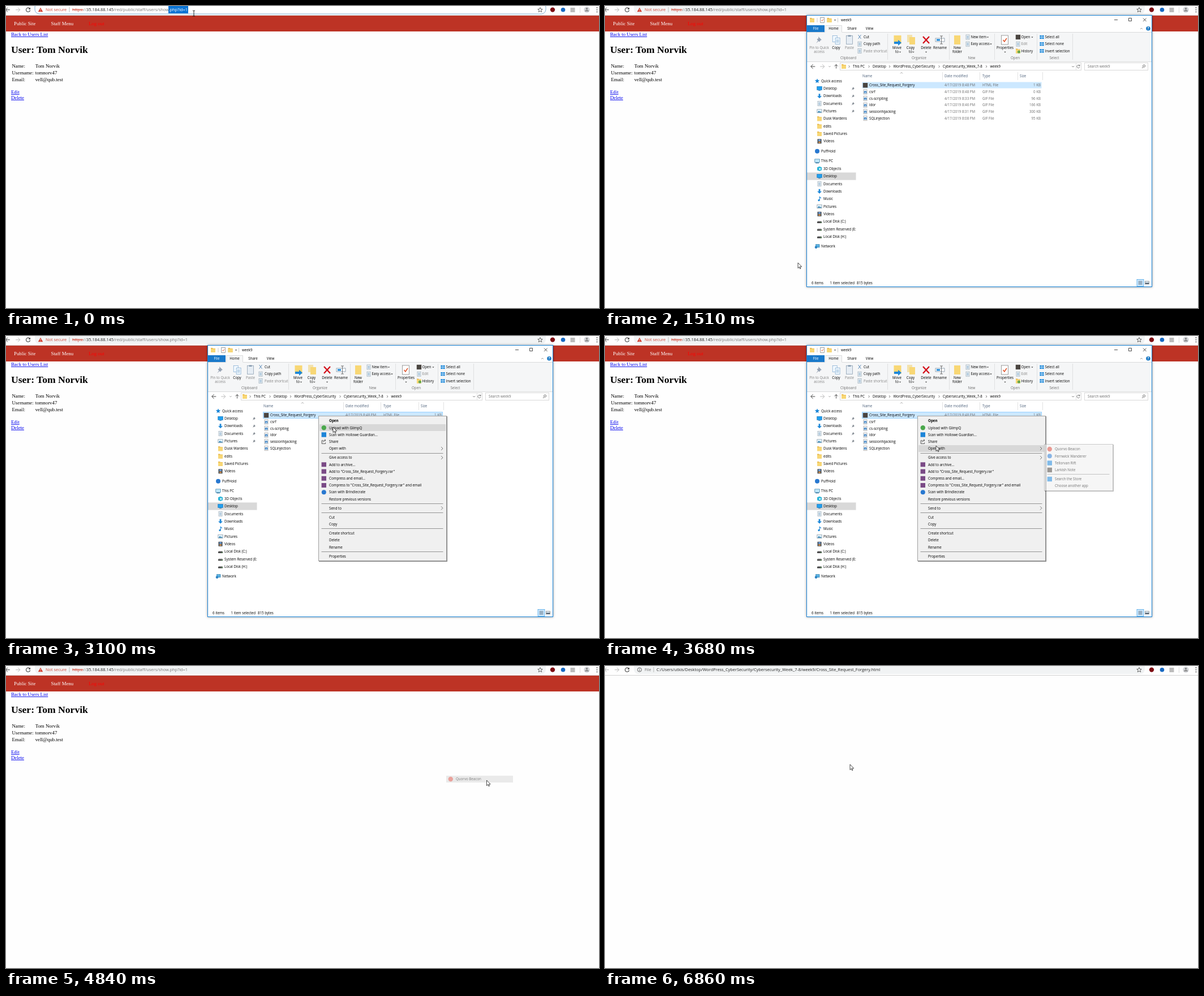
These frames come from a looping animation (1048 px wide and 534 px high, 8000 ms). An HTML page:

```html
<!DOCTYPE html>
<html lang="en">
<head>
<meta charset="utf-8">
<title>Opening a local page</title>
<style>
html, body { margin: 0; width: 100%; height: 100%; overflow: hidden; background: #fefefe; }
svg { display: block; width: 100vw; height: 100vh; }
text { font: 6.2px "Open Sans", "Noto Sans", sans-serif; fill: #000; white-space: pre; }
.url text { font-size: 7.36px; fill: #222; }
.page text { font: 8.8px "Liberation Serif", "Times New Roman", serif; fill: #000; }
.page .title { font-size: 17.6px; font-weight: bold; }
.page .link { fill: #00e; text-decoration: underline; }
.page .nav { fill: #fff; }
.page .out { fill: #f00; }
text.dim, .url .dim { fill: #6d6d6d; }
text.off { fill: #838383; }
text.head { fill: #4c607a; }
text.white { fill: #fff; }
.url .warn { fill: #cf4535; }
text.mid { text-anchor: middle; }
text.end { text-anchor: end; }
text.bold { font-weight: 700; }
#frame { filter: drop-shadow(.5px .5px 2.2px rgba(0, 0, 0, .4)); }
.popup { filter: drop-shadow(1.4px 1.4px .6px rgba(0, 0, 0, .5)); }
</style>
</head>
<body>
<svg id="stage" viewBox="0 0 1048 534"></svg>
<script>
const BLUE = '#1e88d8', GOLD = '#f8d775', INK = '#444';

// Drawing helpers; text and icons are placed by their vertical centre.
const rect = (x, y, w, h, fill, more = '') =>
  `<rect x="${x}" y="${y}" width="${w}" height="${h}" fill="${fill}" ${more}/>`;
const disc = (x, y, r, fill, more = '') => `<circle cx="${x}" cy="${y}" r="${r}" fill="${fill}" ${more}/>`;
const fill = (d, color) => `<path d="${d}" fill="${color}"/>`;
const line = (d, color = INK, w = .8) => `<path d="${d}" fill="none" stroke="${color}" stroke-width="${w}"/>`;
const words = (x, y, s, cls = '') => `<text x="${x}" y="${y}" class="${cls}">${s}</text>`;
const text = (x, y, s, cls) => words(x, y + 2.2, s, cls);
const group = (id, body, more = '') => `<g id="${id}" ${more}>${body}</g>`;
const box = (x, y, w, h, color, stroke) =>
  rect(x - w / 2, y - h / 2, w, h, color, stroke ? `stroke="${stroke}" stroke-width=".7"` : '');
const chevron = (x, y) => line(`M${x - 1} ${y - 2}l2 2-2 2`, INK, .7);
const caret = (x, y) => fill(`M${x - 1.6} ${y - .8}h3.2l-1.6 1.9z`, '#333');
const arrow = (x, y, dir, color) =>
  line(`M${x - 3.8 * dir} ${y}h${7.6 * dir}M${x} ${y - 3.8}l${3.8 * dir} 3.8 ${-3.8 * dir} 3.8`, color, 1);

const icon = {
  none: () => '',
  folder: (x, y) => fill(`M${x - 4} ${y - 4}h3l1 1h4v7h-8z`, '#e8b84b') + rect(x - 4, y - 2.3, 8, 6.3, GOLD),
  doc: (x, y) => box(x, y, 6, 8, '#fff', '#8aa0b0') + line(`M${x - 1.8} ${y - 1.6}h3.6m-3.6 1.8h3.6m-3.6 1.8h3.6`, '#5b8fb8'),
  gif: (x, y) => box(x, y, 6, 8, '#fff', '#9a9a9a') + box(x, y + .5, 4.6, 4, '#3b7fc0') + disc(x, y + 1, 1, '#d8efff'),
  screen: (x, y) => box(x, y - .5, 8.5, 6, '#20a0f0', '#1572b8') + line(`M${x - 2} ${y + 3.6}h4`, '#1572b8'),
  pc: (x, y) => box(x, y - .6, 8.5, 5.6, '#bfe8fa', '#3a7ca5') + line(`M${x - 3} ${y + 3.4}h6`, '#3a7ca5', 1.2),
  down: (x, y) => fill(`M${x - 1.4} ${y - 4}h2.8v4h2.6l-4 4-4-4h2.6z`, BLUE),
  pic: (x, y) => box(x, y, 8.4, 6, '#e5f5ff', '#8494a0') + fill(`M${x - 3.6} ${y + 2.4}l2.6-3 2 2 1-1 1.8 2z`, '#2f7fae'),
  film: (x, y) => box(x, y, 7, 8, '#3c4650') + box(x, y - 1.8, 4, 2.8, '#6fa0d8') + box(x, y + 1.8, 4, 2.8, '#c48a50'),
  cube: (x, y) => fill(`M${x} ${y - 4}l4 1.6v5L${x} ${y + 4.2}l-4-1.6v-5z`, '#28b4d8') + box(x + .8, y + .4, 3, 3, '#d4f4fb'),
  note: (x, y) => disc(x - 1, y + 2.4, 1.7, BLUE) + line(`M${x + .3} ${y + 2.4}v-6l2.6 2.4`, BLUE, 1.1),
  disk: (x, y) => box(x, y + 1.4, 8, 2.8, '#444') + line(`M${x - 3} ${y - .6}h6`, '#aaa', 1) + disc(x + 2.6, y + 1.6, .6, '#6f6'),
  net: (x, y) => box(x + .8, y - 1, 6.4, 5, '#5cb4e4', '#2a78a8') + disc(x - 2, y + 1.4, 2.3, '#2c83c4'),
  star: (x, y) => fill(`M${x} ${y - 4}l1.2 2.8 3 .2-2.3 2 .8 3L${x} ${y + 2.4} ${x - 2.7} ${y + 4}l.8-3-2.3-2 3-.2z`, BLUE),
  share: (x, y) => line(`M${x - 1} ${y - 2}h-2.6v5.6h6.4v-2M${x - 1.4} ${y + 1}q.4-3.4 4.4-3.4m-1.8-1.8l2 1.8-2 1.8`, '#333'),
  dark: (x, y) => box(x, y, 8.4, 8.4, '#4a4540'),
  blue: (x, y) => box(x, y, 8.4, 8.4, '#1c84d8'),
  blueDot: (x, y) => disc(x, y, 4, '#2878d0'),
  greenDot: (x, y) => disc(x, y, 4.2, '#4aa84c'),
  redDot: (x, y) => disc(x, y, 4.2, '#d8493c'),
  purple: (x, y) => box(x, y, 8.4, 8, '#7a4a86'),
  copy: (x, y, c = '#7aa7cf') => box(x - 2.3, y - 2, 8, 11, '#f4faff', c) + box(x + 2.6, y + 2, 8, 11, '#f4faff', c)
    + line(`M${x} ${y}h5m-5 2h5m-5 2h5`, c),
  check: (x, y, s = 1) => box(x, y, 12 * s, 16 * s, '#fff', '#777')
    + line(`M${x - 3 * s} ${y}l${2.4 * s} ${3 * s} ${4 * s}-${6 * s}`, '#e0552d', 1.6 * s),
  tile: (x, y) => box(x, y, 8, 7, '#dceefb')
    + [-2, 2].map(d => box(x + d, y - 1.8, 3.2, 2.6, BLUE) + box(x + d, y + 1.8, 3.2, 2.6, BLUE)).join('')
};

function toolbar() {
  return rect(0, 0, 1048, 17, '#fefefe') + rect(0, 16, 1048, 1, '#d2d2d2')
    + rect(51, -6, 903, 20, '#f1f3f4', 'rx="8" id="pill"')
    + group('back', arrow(3, 6.7, -1, INK)) + arrow(21, 6.7, 1, '#b9b9b9')
    + line('M41.8 4.3a3.6 3.6 0 1 0 .8 3.2', INK, 1.1) + fill('M43 2.6v3.4h-3.4z', INK)
    + line('M944 2.6l1.2 2.8 3 .2-2.3 2 .8 3-2.7-1.6-2.7 1.6.8-3-2.3-2 3-.2z', INK, .8)
    + disc(966, 6.6, 4.2, '#7d0b12') + disc(984.5, 6.8, 3.8, '#1769c2') + box(1001.5, 7, 8, 8, '#bcbcbc')
    + line('M1014.5 2v10', '#d5d5d5') + disc(1026.5, 6.5, 5.2, '#d4d6da')
    + disc(1026.5, 4.8, 1.7, '#888') + fill('M1023 9.5a3.5 2.6 0 0 1 7 0z', '#888')
    + [3, 6.7, 10.4].map(y => disc(1044.5, y, .9, INK)).join('');
}

function webUrl() {
  return rect(287, 0, 35, 13, '#0b74d4', 'id="mark"')
    + fill('M61 2.8l4.2 7.5h-8.4z', '#d23b2b') + line('M61 5v2.6m0 .8v1', '#fff')
    + words(70, 9.4, 'Not secure', 'warn') + line('M112 2v9', '#aaa')
    + '<text x="117" y="9.4"><tspan fill="#d0402f" text-decoration="line-through">https:</tspan><tspan fill="#888">//</tspan>'
    + '35.184.88.145<tspan fill="#777">/red/public/staff/users/show</tspan><tspan id="tail">.php?id=1</tspan></text>';
}

function fileUrl() {
  return disc(61, 6.6, 3.6, 'none', 'stroke="#555" stroke-width=".9"') + line('M61 6v2.8m0-4.6v1', '#555', .9)
    + words(70, 9.4, 'File', 'dim') + line('M86 2v9', '#aaa')
    + words(91, 9.4, 'C:/Users/utkis/Desktop/WordPress_CyberSecurity/Cybersecurity_Week_7-8/week9/Cross_Site_Request_Forgery.html');
}

function page() {
  const rows = [['Name:', 'Tom Norvik'], ['Username:', 'tomnorv47'], ['Email:', 'vell@qub.test']];
  return rect(0, 17, 1048, 28, '#bd3325')
    + words(14, 34, 'Public Site', 'nav') + words(79.5, 34, 'Staff Menu', 'nav') + words(146, 34, 'Log out', 'out')
    + words(9, 53, 'Back to Users List', 'link') + words(9, 82.6, 'User: Tom Norvik', 'title')
    + rows.map(([k, v], i) => words(10.5, 108.8 + i * 12.2, k) + words(51.7, 108.8 + i * 12.2, v)).join('')
    + words(9, 155, 'Edit', 'link') + words(9, 164.8, 'Delete', 'link');
}

function ribbon() {
  const big = (x, s, cls = '') => s.split('|').map((w, i) => text(x, 74 + i * 7, w, 'mid ' + cls)).join('');
  const small = (x, ix, names, art) => names.map((s, i) => {
    const y = 55 + i * 12.2, off = s[0] === '-';
    return icon[art[i]](ix, y) + text(x, y, off ? s.slice(1) : s, off ? 'off' : '');
  }).join('');
  const tabs = [['File', 372.5, 'white'], ['Home', 404], ['Share', 436.5], ['View', 467.5]];
  const titles = [['Clipboard', 430], ['Organize', 555], ['New', 648], ['Open', 725], ['Select', 794]];
  return rect(357, 46, 609, 52, '#f5f6f7') + line('M357 98.5H966M357 46.5H389M419 46.5H966', '#dadbdc', 1)
    + rect(357, 34, 31, 12, '#1979ca') + rect(389, 34, 30, 13, '#f5f6f7') + line('M389.5 46V34.5h29v12', '#dadbdc', 1)
    + tabs.map(([s, x, cls = '']) => text(x, 40, s, 'mid ' + cls)).join('')
    + line('M946 41l2-2 2 2', '#888') + disc(960, 39.7, 3.8, '#1677c5') + text(960, 39.7, '?', 'mid bold white')
    + titles.map(([s, x]) => text(x, 92, s, 'mid dim')).join('')
    + [499.5, 608.5, 688.5, 763.5, 826.5].map(x => line(`M${x} 49v46`, '#dfe0e1', 1)).join('')
    + fill('M377 54l6 6-2 .6-2 3-1.6-1.6-4.4 4 3.4-5-2-2 3-2z', '#98a4b4') + big(378.5, 'Pin to Quick|access', 'off')
    + icon.copy(408.5, 60) + big(408.5, 'Copy') + box(432, 60, 11, 15, '#e6edf4', '#8095aa')
    + box(432, 52.8, 5, 2.4, '#8095aa') + big(432, 'Paste', 'off')
    + line('M447.5 51l5 7m0-7l-5 7', '#3d75ad') + small(457, 450, ['Cut', 'Copy path', '-Paste shortcut'], ['none', 'doc', 'doc'])
    + rect(510.5, 52, 13, 15, GOLD) + fill('M511 63h7v-3l6 5-6 5v-3h-7z', BLUE) + big(516, 'Move|to')
    + caret(521.5, 81.5) + rect(534, 51, 9, 13, '#f3e2ac') + rect(538, 55, 10, 13, GOLD) + big(540, 'Copy|to') + caret(545, 81.5)
    + line('M562 54l11 12m0-12l-11 12', '#d4131d', 2.4) + big(567.5, 'Delete') + caret(567.5, 81.5)
    + box(592, 60, 16, 6, '#fff', '#6e8294') + rect(586, 58.5, 6, 3, BLUE)
    + line('M592 53h5m-2.5 0v14m-2.5 0h5', '#555') + big(592, 'Rename')
    + rect(617, 52, 11, 16, GOLD) + big(622.5, 'New|folder')
    + small(646.5, 641, ['New item', 'Easy access'], ['doc', 'doc']) + caret(676.5, 55.2) + caret(682, 67.4)
    + icon.check(706.5, 60) + big(707, 'Properties') + caret(707, 81.5)
    + small(735.5, 730, ['Open', '-Edit', 'History'], ['dark', 'doc', 'folder']) + caret(755, 55.2)
    + disc(731.5, 81, 2.6, '#6aa84f') + small(777.5, 772, ['Select all', 'Select none', 'Invert selection'], ['tile', 'tile', 'tile']);
}

function tree() {
  const branch = (y0, list) => list.map(([art, s], i) => {
    const y = y0 + i * 13.35;
    return icon[art](379, y) + text(386, y, s);
  }).join('');
  const root = (y, art, s) => icon[art](375, y) + text(382, y, s);
  const pin = y => fill(`M438 ${y - 3}l3 3-1.4.4-1 1.6-.8-.8-2.4 2 2-2.6-.8-.8 1.4-1z`, '#808890');
  return rect(357, 294.4, 86.5, 13.3, '#d9d9d9')
    + root(132.3, 'star', 'Quick access')
    + branch(145.8, [['screen', 'Desktop'], ['down', 'Downloads'], ['doc', 'Documents'], ['pic', 'Pictures'],
      ['folder', 'Dusk Wardens'], ['folder', 'edits'], ['folder', 'Saved Pictures'], ['film', 'Videos']])
    + [0, 1, 2, 3].map(i => pin(146 + i * 13.35)).join('')
    + root(256.8, 'blueDot', 'PuffHold') + root(274.2, 'pc', 'This PC')
    + branch(287.7, [['cube', '3D Objects'], ['screen', 'Desktop'], ['doc', 'Documents'], ['down', 'Downloads'],
      ['note', 'Music'], ['pic', 'Pictures'], ['film', 'Videos'], ['disk', 'Local Disk (C:)'],
      ['disk', 'System Reserved (E:'], ['disk', 'Local Disk (H:)']])
    + root(425.2, 'net', 'Network');
}

function files() {
  const list = [['Cross_Site_Request_Forgery', '8:48', 1], ['csrf', '8:48', 0], ['cs-scripting', '8:33', 96],
    ['idor', '8:46', 166], ['sessionhijacking', '8:31', 300], ['SQLinjection', '8:08', 95]];
  const heads = [['Name', 455], ['Date modified', 600], ['Type', 667], ['Size', 733]];
  return heads.map(([s, x]) => text(x, 124, s, 'head')).join('')
    + [596.5, 662.5, 729.5, 773.5].map(x => line(`M${x} 117v14`, '#e2e2e2', 1)).join('') + line('M522 119.4l2-2 2 2', '#777', .7)
    + rect(454.5, 134.5, 317, 11, '#cce8ff', 'id="row" stroke="#99d1ff"')
    + list.map(([name, time, kb], i) => {
      const y = 140.2 + i * 11.65;
      return icon[i ? 'gif' : 'dark'](460, y) + text(467, y, name) + text(600, y, `4/17/2019 ${time} PM`, 'dim')
        + text(667, y, (i ? 'GIF' : 'HTML') + ' File', 'dim') + text(770, y, kb + ' KB', 'end dim');
    }).join('');
}

function explorer() {
  const crumbs = [['This PC', 438], ['Desktop', 473], ['WordPress_CyberSecurity', 509.5], ['Cybersecurity_Week_7-8', 597], ['week9', 680.5]];
  return rect(356.5, 16.5, 610, 480, '#fff', 'id="frame" stroke="#1883d7"')
    + icon.folder(366, 25) + line('M375 21v8M411.5 21v8', '#aaa', .6) + icon.check(384, 25, .55) + icon.folder(396.5, 25)
    + caret(406.5, 25) + text(417, 25, 'week9')
    + line('M900 24.5h6M925.5 21.5h5v5h-5zM951 21.6l5.6 5.6m0-5.6l-5.6 5.6', '#222')
    + ribbon()
    + arrow(367.5, 107, -1, INK) + arrow(384, 107, 1, '#bbb') + line('M395.4 106.2l1.6 1.6 1.6-1.6', '#777', .7)
    + line('M408.5 110.5v-7m-3 3l3-3 3 3', INK, .9)
    + rect(415.5, 100.5, 426, 13, '#fff', 'stroke="#d9d9d9"') + icon.folder(422, 107) + line('M832.5 101v12', '#e2e2e2', 1)
    + crumbs.map(([s, x]) => text(x, 107, s) + chevron(x - 6.5, 107)).join('')
    + line('M825.4 106.2l1.8 1.8 1.8-1.8M838.6 105.4a2.6 2.6 0 1 0 .4 2.4M839 103.6v2.2h-2.2', INK, .7)
    + rect(847.5, 100.5, 112, 13, '#fff', 'stroke="#d9d9d9"') + text(853, 107, 'Search week9', 'dim')
    + disc(952.6, 106, 2, 'none', 'stroke="#555" stroke-width=".8"') + line('M951.2 107.6l-2.2 2.4', '#555')
    + tree() + files()
    + text(365, 489.5, '6 items') + text(397.5, 489.5, '1 item selected') + text(445, 489.5, '815 bytes')
    + box(946, 489.5, 12, 12, '#cce8ff', '#3b9be0') + line('M942.5 487h7m-7 2.4h7m-7 2.4h7', '#456', .9)
    + box(958, 489.3, 7, 5, '#dfeaf2', '#777') + rect(955, 489.5, 6, 2, '#456');
}

// Entries: y, icon, label, and whether a submenu follows.
const MENU = [[150, 'none', 'Open'], [162.3, 'greenDot', 'Upload with GlimpQ'], [174.5, 'blue', 'Scan with Hollowe Guardian...'],
  [186.8, 'share', 'Share'], [199, 'none', 'Open with', 1], [215.1, 'none', 'Give access to', 1], [227.3, 'purple', 'Add to archive...'],
  [239.5, 'purple', 'Add to "Cross_Site_Request_Forgery.rar"'], [251.8, 'purple', 'Compress and email...'],
  [264, 'purple', 'Compress to "Cross_Site_Request_Forgery.rar" and email'], [276.2, 'blueDot', 'Scan with Brindlecrate'],
  [288.3, 'none', 'Restore previous versions'], [304.3, 'none', 'Send to', 1], [320.6, 'none', 'Cut'], [332.8, 'none', 'Copy'],
  [348.9, 'none', 'Create shortcut'], [361.1, 'none', 'Delete'], [373.3, 'none', 'Rename'], [389.3, 'none', 'Properties']];
const APPS = [[200, 'redDot', 'Quorvo Beacon'], [212.3, 'blueDot', 'Fernwick Wanderer'], [224.6, 'blue', 'Tellorvan Rift'],
  [236.9, 'dark', 'Larkish Note'], [253, 'blue', 'Search the Store'], [265.2, 'none', 'Choose another app']];

const popup = (x, y, w, h, rules, list, hoverId) =>
  rect(x, y, w, h, '#f0f0f0', 'class="popup" stroke="#a0a0a0"')
  + rect(x + 1.5, 0, w - 3, 12, '#d8d8d8', `id="${hoverId}"`)
  + rules.map(r => line(`M${x + 5} ${r}H${x + w - 6}`, '#949494', 1)).join('')
  + list.map(([cy, art, s, sub]) => icon[art](x + 9.3, cy) + text(x + 18.5, cy, s, s === 'Open' ? 'bold' : '')
    + (sub ? line(`M${x + w - 9.5} ${cy - 3}l3 3-3 3`, '#444', .7) : '')).join('');

const stage = document.getElementById('stage');
stage.innerHTML = toolbar()
  + group('web', group('webUrl', webUrl(), 'class="url"') + group('page', page(), 'class="page"'))
  + group('local', fileUrl(), 'class="url"')
  + group('window', explorer())
  + group('menu', popup(552.5, 141.5, 226, 256, [207.5, 296.5, 312.5, 340.5, 381.5], MENU, 'menuHover'))
  + group('apps', popup(776.5, 191.5, 121, 82, [244.5], APPS, 'appHover'))
  + group('chosen', rect(778, 194, 118, 12, '#d8d8d8') + icon.redDot(785.8, 200) + text(795, 200, APPS[0][2]))
  + group('pointer', '<path d="M0 0V9.6L2.2 7.5 3.6 10.7 5 10.1 3.6 7H6.7Z" fill="#fff" stroke="#111" stroke-width=".75"/>')
  + group('beam', line('M-2-5q2 0 2 1 0-1 2-1M0-4V4M-2 5q2 0 2-1 0 1 2 1', '#111', .9));

const el = Object.fromEntries([...stage.querySelectorAll('[id]')].map(n => [n.id, n]));

// Steps: start time, then values held until the next entry.
const CURSOR = [[0, 332, 13], [120, 331, 13], [240, 325, 48], [360, 314, 95], [510, 301, 132], [660, 255, 235], [780, 184, 388],
  [930, 118, 498], [1080], [1510, 341, 454], [1660, 400, 372], [1780, 468, 262], [1900, 530, 172], [2020, 552, 141],
  [2980, 566, 150], [3100, 578, 161], [3250, 581, 183], [3370, 585, 194], [3950, 655, 198], [4080, 745, 203],
  [4200, 822, 214], [4320, 849.5, 202], [4990, 809, 205], [5140, 742, 201], [5260, 676, 198], [5380, 610, 195],
  [5500, 554, 194], [5650, 548, 194], [6050, 545, 194], [6170, 542, 193], [6320, 508, 186], [6440, 470, 180],
  [6590, 455, 177], [6710, 442, 176], [6860, 433, 174]];
const WINDOW = [[0, 0], [1390, .55], [1510, 1], [4840, 0]];
const MENU_SHOW = [[0, 0], [2680, .55], [2820, 1], [4840, 0]];
const APPS_SHOW = [[0, 0], [3680, .55], [3800, 1], [4840, 0]];
const MENU_HOVER = [[0, -1], [2980, 0], [3100, 1], [3250, 3], [3370, 4]];
const APP_HOVER = [[0, -1], [4200, 1], [4320, 0]];

const at = (steps, t) => steps.findLast(s => s[0] <= t);
const show = (node, alpha) => {
  node.style.display = alpha ? '' : 'none';
  node.setAttribute('opacity', +alpha);
};
const hover = (node, list, i) => {
  show(node, i >= 0);
  if (i >= 0) node.setAttribute('y', Math.round(list[i][0] - 6));
};

function draw(t) {
  const local = t >= 4990, focused = t < 660, marked = t < 120;
  show(el.web, !local);
  show(el.local, local);
  el.back.setAttribute('opacity', local ? .4 : 1);
  el.pill.setAttribute('fill', focused ? '#fff' : '#f1f3f4');
  el.pill.setAttribute('stroke', focused ? '#84b2d6' : 'none');
  show(el.mark, marked);
  el.tail.setAttribute('fill', marked ? '#fff' : '#777');

  const open = at(WINDOW, t)[1], k = open < 1 ? .96 : 1;
  show(el.window, open);
  el.window.setAttribute('transform', `translate(${662 * (1 - k)} ${256 * (1 - k)}) scale(${k})`);
  el.row.setAttribute('stroke-opacity', t >= 2020 ? 1 : 0);
  show(el.menu, at(MENU_SHOW, t)[1]);
  show(el.apps, at(APPS_SHOW, t)[1]);
  hover(el.menuHover, MENU, at(MENU_HOVER, t)[1]);
  hover(el.appHover, APPS, at(APP_HOVER, t)[1]);
  show(el.chosen, t >= 4840 && !local ? .5 : 0);

  const [, x, y] = at(CURSOR, t), beam = t < 240;
  show(el.beam, beam);
  show(el.pointer, !beam && x !== undefined);
  if (x !== undefined) (beam ? el.beam : el.pointer).setAttribute('transform', `translate(${x} ${y})`);
}

function tick() {
  draw(performance.now() % 8000);
  requestAnimationFrame(tick);
}
tick();
</script>
</body>
</html>
```
